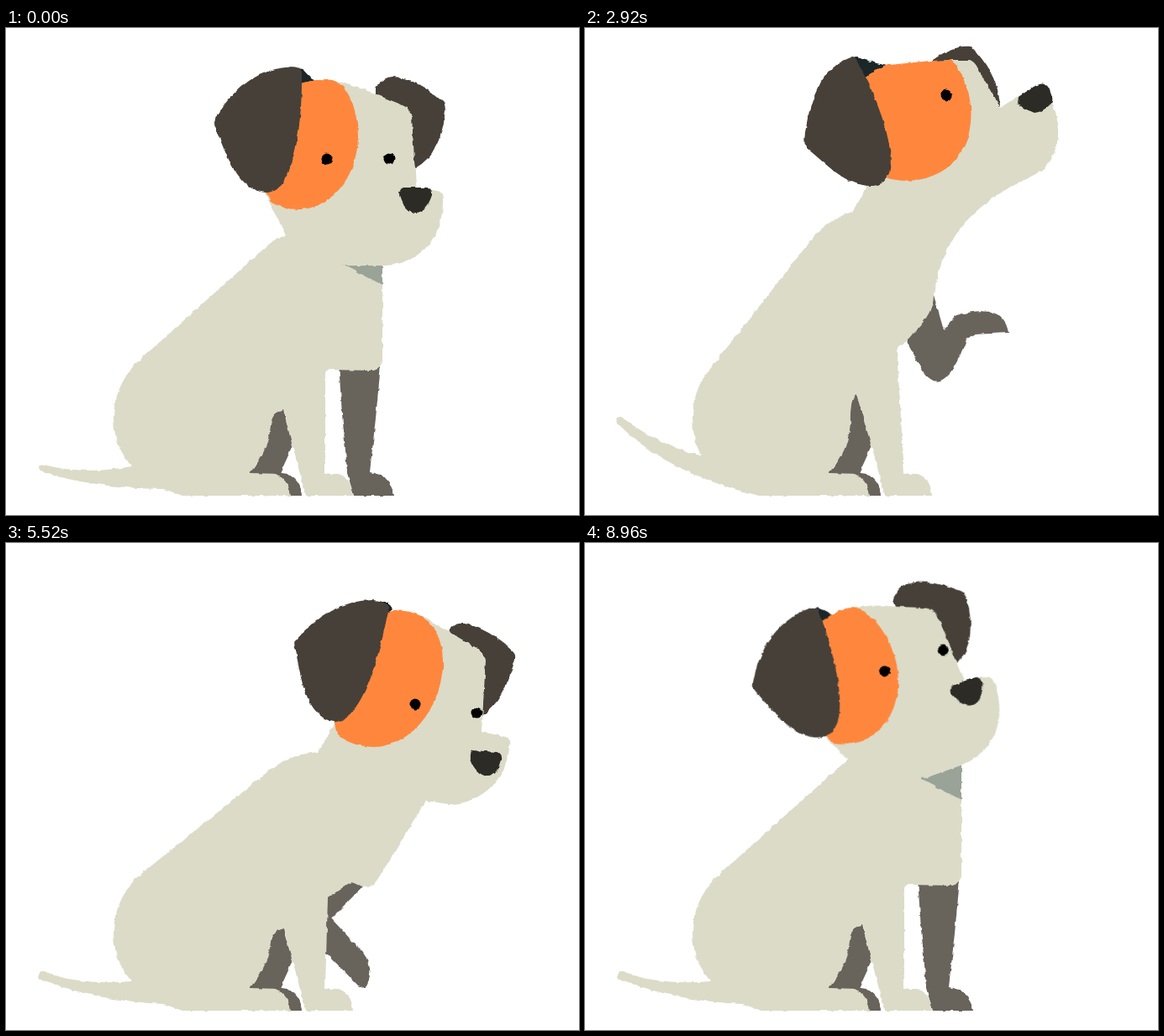
Animation of 682 by 580 pixels, one loop 9000 ms. Source, as an HTML page:

```html
<!DOCTYPE html>
<html>
<head>
<meta charset="utf-8">
<style>
html, body { margin: 0; width: 100%; height: 100%; overflow: hidden; background: #fff; }
svg { display: block; width: 682px; height: 580px; }
</style>
</head>
<body>
<svg viewBox="0 0 682 580">
  <filter id="rough" filterUnits="userSpaceOnUse" x="0" y="0" width="682" height="580" color-interpolation-filters="sRGB">
    <feTurbulence type="fractalNoise" baseFrequency=".12" numOctaves="2" seed="4"/>
    <feDisplacementMap in="SourceGraphic" scale="4" xChannelSelector="R" yChannelSelector="G"/>
  </filter>
  <g filter="url(#rough)"><g id="torso"></g><g id="head"></g></g>
</svg>
<script>
const LOOP = 9000, STEP = 40;
const CREAM = '#dbdbc8', EAR = '#464038', LEG = '#68635b';
const torso = document.getElementById('torso'), head = document.getElementById('head');

function add(parent, tag, fill) {
  const el = document.createElementNS('http://www.w3.org/2000/svg', tag);
  el.setAttribute('fill', fill);
  return parent.appendChild(el);
}

// Each part has one outline per pose: sitting, leaning, looking up.
const parts = [];
function part(parent, fill, ...poses) {
  const values = poses.map(p => p.match(/\d+/g).map(Number));
  parts.push({ el: add(parent, 'path', fill), shape: poses[0], values });
}

// Far front leg
part(torso, LEG,
  'M447 390L440 465L433 529Q458 532 462 557L414 557L406 530C404 500 402 480 400 460L396 400Z',
  'M428 406L387 447L425 488Q440 508 428 529L422 530L380 487C375 470 378 440 380 425L400 395Z',
  'M415 318L427 360L442 342Q500 326 504 363L462 365L454 371C434 426 416 432 400 405L381 369Z');
const tail = add(torso, 'path', CREAM);
const rearFoot = add(torso, 'path', LEG);
rearFoot.setAttribute('d', 'M318 529L335 531Q352 540 352 557L330 557Z');
// Body with near legs
part(torso, CREAM,
  'M360 235L333 247Q318 252 308 262L155 399Q128 428 128 465Q129 520 185 548L210 557L339 557Q336 536 318 530L330 470L331 456L341 498L357 557L413 557Q411 534 394 531L380 531L380 412Q380 407 386 407L436 408Q448 406 448 396Q448 330 448 262L400 240Z',
  'M392 214L372 249Q338 251 312 272L155 399Q128 428 128 465Q129 520 185 548L210 557L339 557Q336 536 318 530L330 472L331 460L341 498L357 557L413 557Q411 534 394 531L380 531L383 423Q385 421 410 404L424 409Q436 411 442 402Q470 355 505 298L500 240Z',
  'M338 185L318 219Q288 228 268 254L149 406Q128 430 128 465Q128 512 165 540L207 557L339 557Q336 536 318 530L324 460L323 438L341 498L357 557L413 557Q411 534 394 531L380 531L371 382Q378 376 386 369L391 363Q415 340 415 318Q426 243 484 204L440 150Z');
// Rear far leg
part(torso, LEG,
  'M330 454Q316 458 315 474Q312 505 290 530L326 531L341 498Z',
  'M330 459Q316 462 315 476Q312 505 290 530L326 531L341 498Z',
  'M323 436Q315 442 316 470Q314 505 290 530L326 531L341 498Z');
// Neck shadow
part(torso, '#9aa397',
  'M400 281L448 306L448 250L400 250Z',
  'M480 290L498 300L500 280L480 270Z',
  'M440 190L450 195L450 180L440 180Z');
// Far ear
part(head, EAR,
  'M440 84L440 70Q450 57 462 58Q488 60 519 87Q523 90 523 98Q518 150 487 167L470 95Z',
  'M527 110L528 103Q534 94 546 96Q575 102 602 128Q607 132 606 138Q592 190 567 205L560 125Z',
  'M405 45L414 38Q432 25 445 23Q452 21 459 22Q463 23 466 29Q493 60 494 94L460 40Z');
// Face
part(head, CREAM,
  'M333 247L305 190L300 110L375 61Q410 64 438 78L470 91Q482 96 483 106L488 190L514 194Q520 195 520 206C520 252 490 282 450 283L404 283Z',
  'M420 260L392 216L390 150L470 80Q497 84 512 97L560 125Q570 131 571 140L566 225L595 231Q600 233 599 242C597 285 560 312 527 311L500 307Z',
  'M335 190L320 160L335 60L400 41Q430 38 440 38L458 38Q463 40 466 45L494 95L524 76Q548 66 556 88C570 125 563 158 538 173L468 211Z');
// Inside of near ear
part(head, '#1b2629',
  'M345 50L352 48L368 65L350 75Z',
  'M448 70L455 70L460 79L450 88Z',
  'M318 36L323 35L358 45L332 62Z');
// Eye patch
part(head, '#ff873d',
  'M350 66Q368 61 382 61C408 62 419 100 419 130C418 180 385 216 347 216Q328 215 316 208L309 195L330 120Z',
  'M453 82Q465 80 474 81C510 86 521 115 520 148C516 200 480 243 436 243Q408 241 394 228L390 210L430 150Z',
  'M333 60Q345 48 360 44C385 42 415 38 437 38C476 85 468 178 385 182Q370 182 362 179L352 176L340 100Z');
// Near ear
part(head, EAR,
  'M249 108Q282 50 340 46Q350 46 352 52C353 110 344 196 310 196C275 195 260 145 249 118Q247 113 249 108Z',
  'M344 118Q385 68 436 68Q450 68 456 76C448 115 428 212 391 213C358 208 350 160 345 127Q342 122 344 118Z',
  'M262 125Q272 52 314 36Q320 33 324 40C352 90 388 186 342 188C312 190 285 160 264 143Q260 138 262 125Z');
// Nose
part(head, '#2c2b25',
  'M473 190L501 190Q508 191 507 199Q500 220 487 220Q474 219 468 199Q468 192 473 190Z',
  'M556 247L585 249Q591 251 590 258Q585 278 573 278Q558 275 552 256Q551 248 556 247Z',
  'M516 82L534 70Q546 63 551 70Q558 82 556 89Q544 101 535 101Q521 96 515 90Q513 85 516 82Z');
const eyes = [
  { x: [382, 487, 430], y: [156, 192, 80] },
  { x: [456, 560, 487], y: [156, 202, 85] }
].map(e => ({ ...e, el: add(head, 'ellipse', '#000') }));

// time, lean weight, up weight
const poseKeys = [
  [0, 0, 0], [1880, 0, 0], [2320, 1.25, 0], [2880, 0, 1], [4680, 0, 1],
  [5280, 1, 0], [5560, 1, 0], [6160, 0, 0], [LOOP, 0, 0]
];
// time, head angle, head dx, dy, eye dx, dy
const headKeys = [
  [0, 0, 0, 0, 0, 0], [900, -.5, -1, 0, 0, 0], [1400, -5.5, -10.5, 1, 10.5, -6],
  [1880, -5.5, -10.5, 1, 10.5, -6], [2320, 0, 0, 0, 0, 0], [2920, 0, 0, 0, 0, 0],
  [3300, 2, 8, 3, 0, 0], [4640, 2, 8, 3, 0, 0], [4880, 0, 0, -1, 0, 0],
  [5240, 0, 0, 0, 0, 0], [5560, 0, 0, 0, 0, 0], [6200, -5.9, -12, 1.5, 19.6, -11],
  [6960, -5.9, -12, 1.5, 19.6, -11], [7840, -19.6, -40, 9, 19.7, -9],
  [LOOP, -19.6, -40, 9, 19.7, -9]
];
// time, tail wags completed
const wagKeys = [
  [0, -.07], [1440, 2.19], [2920, 4.25], [3960, 5.5],
  [5520, 7.81], [6920, 9.63], [8960, 12.81], [LOOP, 12.87]
];

const smooth = k => k * k * (3 - 2 * k);
function sample(keys, t, ease = smooth) {
  const i = keys.findIndex(k => k[0] > t), a = keys[i - 1], b = keys[i];
  const k = ease((t - a[0]) / (b[0] - a[0]));
  return a.slice(1).map((v, j) => v + (b[j + 1] - v) * k);
}

function drawTail(t, up) {
  const wag = Math.cos(2 * Math.PI * sample(wagKeys, t, k => k)[0]);
  const angle = 5 + 16.5 * up - (7.5 + 15.5 * up) * wag;
  const at = (deg, r) => {
    const a = deg * Math.PI / 180;
    return [175 - r * Math.cos(a), 520 - r * Math.sin(a)];
  };
  const [x, y] = at(angle, 132 + 11 * up);
  // The round tip faces across the tail's own bend.
  const a = (angle + 28) * Math.PI / 180, nx = 4.5 * Math.sin(a), ny = -4.5 * Math.cos(a);
  tail.setAttribute('d', `M150 ${522 - 10 * up}Q${at(angle * .95 - 7, 85)} ${x + nx} ${y + ny}` +
    `A4.5 4.5 0 0 0 ${x - nx} ${y - ny}Q${at(angle * .55 - 19, 80)} ${187 + 20 * up} ${549 + 8 * up}L200 520Z`);
}

function draw(t) {
  const [lean, up] = sample(poseKeys, t);
  const mix = (a, b, c) => a * (1 - lean - up) + b * lean + c * up;
  for (const { el, shape, values: [a, b, c] } of parts) {
    let i = 0;
    el.setAttribute('d', shape.replace(/\d+/g, () => mix(a[i], b[i], c[i++]).toFixed(1)));
  }
  drawTail(t, up);

  const [angle, dx, dy, ex, ey] = sample(headKeys, t);
  head.setAttribute('transform', `translate(${dx} ${dy}) rotate(${angle} 390 160)`);
  const open = Math.min(1, Math.max(.1, Math.abs(t - 4020) / 90));
  eyes.forEach(({ el, x, y }, i) => {
    const r = 6.5 * (i ? Math.max(0, 1 - up * 1.3) : 1);
    el.setAttribute('cx', mix(...x) + ex);
    el.setAttribute('cy', mix(...y) + ey);
    el.setAttribute('rx', r);
    el.setAttribute('ry', r * open);
  });
}

function frame() {
  draw(Math.floor(performance.now() % LOOP / STEP) * STEP);
  requestAnimationFrame(frame);
}
frame();
</script>
</body>
</html>
```
